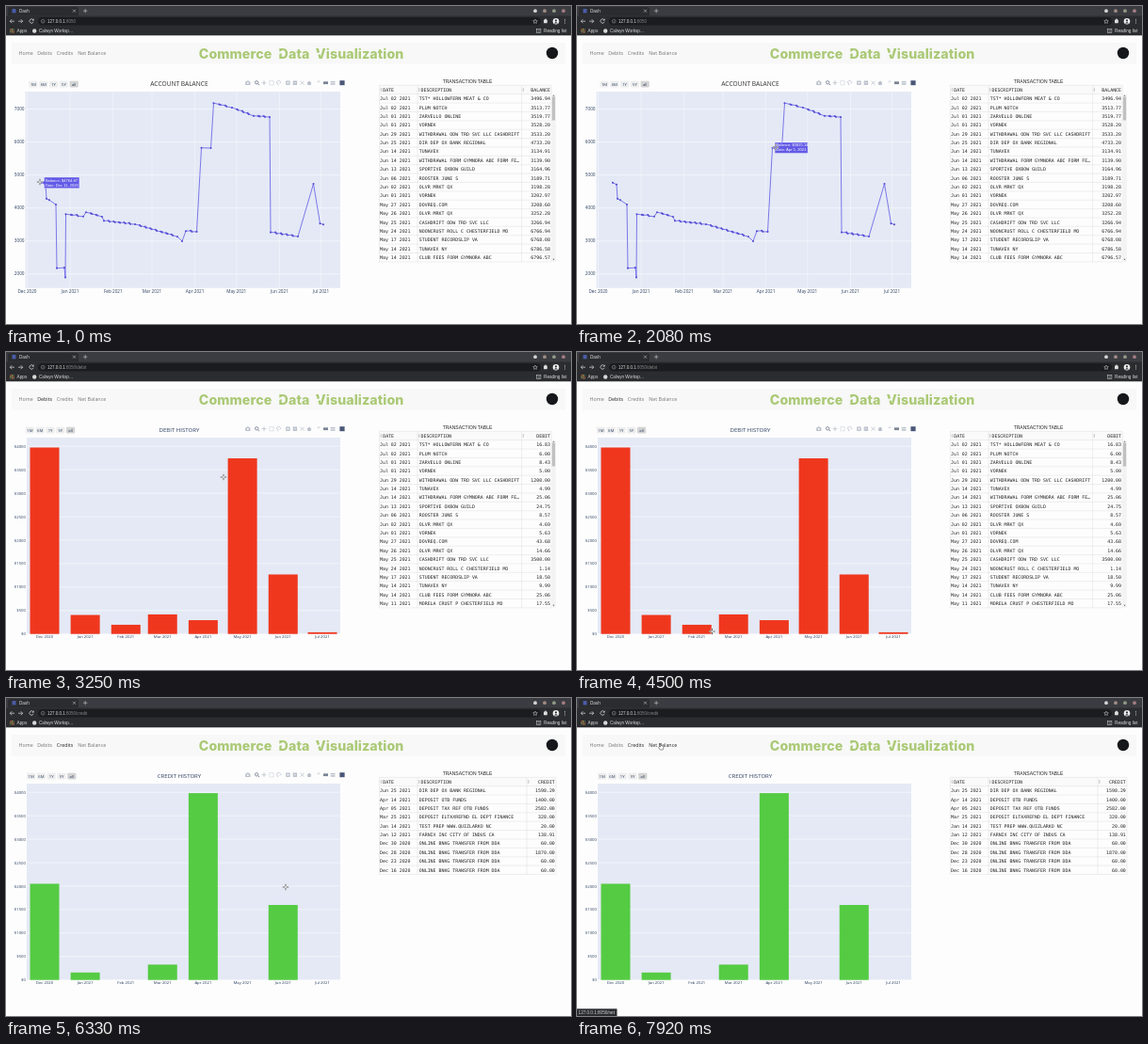
An HTML page for the animation above (8 s loop, 600 by 338 pixels).

```html
<!DOCTYPE html>
<html lang="en">
<head>
<meta charset="utf-8">
<title>Dash</title>
<style>
html, body { margin: 0; width: 100%; height: 100%; overflow: hidden; background: #fdfdfd; }
svg { display: block; width: 100vw; height: 100vh; font-family: "Liberation Sans", Arial, sans-serif; }
.mono { font: 4.92px "DejaVu Sans Mono", monospace; fill: #222; }
.title { font: 800 14.2px Inter, sans-serif; letter-spacing: .1px; fill: #abc976; }
#nav { font-family: "Noto Sans", sans-serif; }
.plot { font-family: "Open Sans", sans-serif; }
</style>
</head>
<body>
<svg viewBox="0 0 600 338">
  <g id="chrome"></g>
  <g id="nav"></g>
  <g id="page"></g>
  <g id="modebar"></g>
  <g id="tip"></g>
  <g id="status"></g>
  <g id="cursor"></g>
</svg>
<script>
const LOOP = 8000, STEP = 1000 / 12;
const $ = id => document.getElementById(id);
const rect = (x, y, w, h, fill, extra = '') =>
  `<rect x="${x}" y="${y}" width="${w}" height="${h}" fill="${fill}" ${extra}/>`;
const circle = (x, y, r, fill, extra = '') => `<circle cx="${x}" cy="${y}" r="${r}" fill="${fill}" ${extra}/>`;
const text = (x, y, s, size, fill, anchor = 'start') =>
  `<text x="${x}" y="${y}" font-size="${size}" fill="${fill}" text-anchor="${anchor}">${s}</text>`;
const mono = (x, y, s, anchor = 'start') => `<text class="mono" x="${x}" y="${y}" text-anchor="${anchor}">${s}</text>`;
const stroke = (d, color, width = .5, extra = '') =>
  `<path d="${d}" fill="none" stroke="${color}" stroke-width="${width}" ${extra}/>`;
const fillPath = (d, color) => `<path d="${d}" fill="${color}"/>`;
const parse = s => s.split('\n').map(r => r.split('|'));

const MONTHS = ['Dec', 'Jan', 'Feb', 'Mar', 'Apr', 'May', 'Jun', 'Jul'];
const DAYS = MONTHS.map((_, i) => (Date.UTC(2020, 11 + i) - Date.UTC(2020, 11)) / 864e5);
const monthLabel = i => `${MONTHS[i]} ${i ? 2021 : 2020}`;

// Date, description, change of balance
const ledger = parse(`Jul 02 2021|TST* HOLLOWFERN MEAT &amp; CO|-16.83
Jul 02 2021|PLUM NOTCH|-6.00
Jul 01 2021|ZARVELLO ONLINE|-8.43
Jul 01 2021|VORNEK|-5.00
Jun 29 2021|WITHDRAWAL ODW TRD SVC LLC CASHDRIFT|-1200.00
Jun 25 2021|DIR DEP OX BANK REGIONAL|1598.29
Jun 14 2021|TUNAVEX|-4.99
Jun 14 2021|WITHDRAWAL FORM GYMNORA ABC FORM FE…|-25.06
Jun 13 2021|SPORTIVE OXBOW GUILD|-24.75
Jun 06 2021|ROOSTER JUNE S|-8.57
Jun 02 2021|OLVR MRKT QX|-4.69
Jun 01 2021|VORNEK|-5.63
May 27 2021|DOVREQ.COM|-43.68
May 26 2021|OLVR MRKT QX|-14.66
May 25 2021|CASHDRIFT ODW TRD SVC LLC|-3500.00
May 24 2021|NOONCRUST ROLL C CHESTERFIELD MO|-1.14
May 17 2021|STUDENT RECORDSLIP VA|-18.50
May 14 2021|TUNAVEX NY|-9.99
May 14 2021|CLUB FEES FORM GYMNORA ABC|-25.06
May 11 2021|MORELA CRUST P CHESTERFIELD MO|-17.55`);

const deposits = parse(`Jun 25 2021|DIR DEP OX BANK REGIONAL|1598.29
Apr 14 2021|DEPOSIT OTB FUNDS|1400.00
Apr 05 2021|DEPOSIT TAX REF OTB FUNDS|2582.00
Mar 25 2021|DEPOSIT ELTAXREFND EL DEPT FINANCE|328.00
Jan 14 2021|TEST PREP WWW.QUIZLARKO NC|20.00
Jan 12 2021|FARNIX INC CITY OF INDUS CA|138.91
Dec 30 2020|ONLINE BNKG TRANSFER FROM DDA|60.00
Dec 28 2020|ONLINE BNKG TRANSFER FROM DDA|1870.00
Dec 23 2020|ONLINE BNKG TRANSFER FROM DDA|60.00
Dec 16 2020|ONLINE BNKG TRANSFER FROM DDA|60.00`);

let balance = 3496.94;
const balances = ledger.slice(0, 19).map(([date, desc, change]) => {
  const row = [date, desc, balance.toFixed(2)];
  balance -= change;
  return row;
});
const debits = ledger.filter(r => r[2] < 0).map(([date, desc, change]) => [date, desc, change.slice(1)]);
const income = MONTHS.map(m => deposits.reduce((sum, r) => sum + (r[0].startsWith(m) ? +r[2] : 0), 0));

// Turning points of the balance (x, dollars); gentle stretches get small uneven steps
const dollarY = v => 109.5 + (7000 - v) * .03506;
const turns = `38,4764.87 42,4710 43,4280 46,4240 53,4105 54,2175 62,2190 63,1895 63.5,3810 82,3740 85,3870
102,3735 104,3610 137,3505.05 182,3130 187,2993 191,3300 202.5,3280 207.5,5825.14 217.5,5816 220.5,7180
240,7040 263,6790 280,6758 281,3260 310,3135 326.5,4733.2 333.5,3530 337,3496.94`
  .split(/\s+/).map(p => p.split(',').map(Number));
let seed = 7;
const random = () => (seed = seed * 16807 % 2147483647) / 2147483647;
const samples = turns.flatMap(([x, v], i) => {
  const out = [[x, v]], [x1, v1] = turns[i + 1] || [x, v];
  const n = Math.abs(v1 - v) < 500 ? Math.floor((x1 - x) / 5.1) : 1;
  for (let k = 1; k < n; k++) {
    const f = k / n, px = x + (x1 - x) * f, pv = v + (v1 - v) * f, d = 8 + 18 * random();
    out.push([px - .6, pv + d], [px + .6, pv - d * .4]);
  }
  return out;
}).map(([x, v]) => ({ x, v, y: dollarY(v) }));

const BASE = 299.7;
const bars = values => values.map((v, i) => ({ i, v, x: 41 + 1.3915 * DAYS[i], y: BASE - v * .04987 }));
const PAGES = [
  { path: '', title: 'ACCOUNT BALANCE', buttons: 29, color: '#625ae6', rows: balances, head: 'BALANCE' },
  { path: '/debit', title: 'DEBIT HISTORY', buttons: 25.4, color: '#ef371e', rows: debits, head: 'DEBIT', label: 'Debit',
    bars: bars([3974, 405, 196, 417, 294, 3743, 1268, 36]) },
  { path: '/credit', title: 'CREDIT HISTORY', buttons: 26.6, color: '#55cb43', rows: deposits, head: 'CREDIT', label: 'Credit',
    bars: bars(income) }
];

function drawChrome() {
  let s = rect(0, 0, 600, 31.3, '#2b2c2f') + rect(0, 0, 600, 10.5, '#3b3c41') +
    fillPath('M2 10.5V2.5Q2 1 4 1H74Q77 1 77 3V10.5Z', '#2b2c2f') +
    rect(6.5, 3, 4, 4.4, '#4b5ca8') + text(14, 7, 'Dash', 4.6, '#ddd') +
    stroke('M71 3.7l3 3m0-3l-3 3M82 5.2h4.4M84.2 3v4.4', '#ccc', .6);
  ['#d5d5d5', '#a08c86', '#8f9a86', '#a37d84'].forEach((c, i) => { s += circle(562 + i * 10, 5.2, 1.9, c); });
  s += rect(34, 12, 534, 8.6, '#1b1c1f', 'rx="4.3"') +
    stroke('M14 16.2H9.3m2-2l-2 2 2 2M18 16.2h4.7m-2-2l2 2-2 2', '#ddd', .7, 'transform="translate(-5)"') +
    stroke('M29 14.8a2.2 2.2 0 1 0 .2 2M29.3 13.6v1.6h-1.7', '#ddd', .7) +
    circle(39.2, 16.2, 1.9, 'none', 'stroke="#aaa" stroke-width=".5"') + stroke('M39.2 15.8v1.4', '#aaa') +
    stroke('M562 14l.7 1.5 1.6.2-1.2 1.1.3 1.6-1.4-.8-1.4.8.3-1.6-1.2-1.1 1.6-.2z', '#ddd') +
    rect(571, 14.6, 3.8, 3.6, '#ddd', 'rx=".6"') + circle(573, 14.4, .9, '#ddd') +
    circle(584, 16.2, 3.3, '#eee') + circle(584, 15.4, 1.1, '#34363b') + fillPath('M582 18.4q2-3 4 0z', '#34363b');
  for (let i = 0; i < 3; i++) s += circle(593.5, 14.3 + i * 1.8, .5, '#ddd');
  const dots = ['#dd6655', '#e5b64b', '#68a764'];
  for (let i = 0; i < 9; i++) {
    const col = i % 3, row = i / 3 | 0;
    s += rect(4.3 + col * 1.6, 24.2 + row * 1.6, 1.1, 1.1, dots[(col + row) % 3]);
  }
  s += text(11.6, 28.2, 'Apps', 4.7, '#ddd') + circle(30.2, 26.5, 2.2, '#d8d8d8') +
    text(35, 28.2, 'Calwyn Worksp…', 4.6, '#ddd') +
    rect(563.5, 24.4, 4.4, 4.2, 'none', 'stroke="#ddd" stroke-width=".5"') +
    stroke('M564.5 25.8h2.5M564.5 27.2h2.5', '#ddd', .4) + text(571, 28.2, 'Reading list', 4.7, '#ddd') +
    '<text x="44" y="17.9" font-size="4.5" fill="#ddd">127.0.0.1<tspan id="url" fill="#858688"></tspan></text>' +
    rect(6, 39, 588, 22.5, '#f7f8f7');
  [[204.8, 'Commerce'], [289.6, 'Data'], [328.8, 'Visualization']].forEach(([x, w]) => {
    s += `<text class="title" x="${x}" y="55.5">${w}</text>`;
  });
  // Stencil cuts in the capitals
  s += stroke('M289 50.3l5-1.8M328.5 52.3l6.3-3', '#f7f8f7', 2) + circle(580, 50, 6.2, '#15171a');
  $('chrome').innerHTML = s;
}

const LINKS = [['Home', 13.6, 28.5], ['Debits', 33.2, 49], ['Credits', 53.8, 71.5], ['Net Balance', 76.3, 106.5]];
const ROUTES = ['/', '/debit', '/credit', '/net'];

function drawTable(rows, head, scroll) {
  const top = 84.3, h = 9.38, left = 396.5, bottom = top + h * (rows.length + 1);
  const [split, right] = scroll ? [547.5, 579.2] : [553, 584];
  let s = text(490, 81.6, 'TRANSACTION TABLE', 5, '#222', 'middle') + rect(left, top, right - left, h, '#fafafa');
  let lines = '';
  for (let i = 0; i <= rows.length + 1; i++) lines += `M${left} ${top + i * h}H${right}`;
  for (const x of [left, 437, split, right]) lines += `M${x} ${top}V${bottom}`;
  s += stroke(lines, '#d6d6d6', .4);
  for (const x of [398.4, 438.6, split + 1.8]) {
    s += fillPath(`M${x - .9} 88.6l.9-1.6.9 1.6zM${x - .9} 89.4l.9 1.6.9-1.6z`, '#aaa');
  }
  s += mono(400.2, 90.8, 'DATE') + mono(440.5, 90.8, 'DESCRIPTION') + mono(right - 1.2, 90.8, head, 'end');
  rows.forEach(([date, desc, value], i) => {
    const y = top + h * (i + 1) + 6.5;
    s += mono(397, y, date) + mono(438.8, y, desc) + mono(right - 1.2, y, value, 'end');
  });
  if (scroll) {
    s += rect(579.2, 93.7, 4.6, 178, '#f3f3f3') + rect(579.8, 96.5, 3.4, 25, '#c1c1c1') +
      fillPath('M580.5 95.8l1-1.4 1 1.4zM580.5 268.8l1 1.4 1-1.4z', '#666');
  }
  return s;
}

function drawPage(n) {
  const p = PAGES[n], ink = '#2a3f5f', left = n ? 22 : 20.5, scale = n ? .357 : .39;
  const small = 12 * scale;
  let s = rect(left, 91, 355 - left, BASE - 91, '#e4e9f5') +
    text(184, 85.2, p.title, 17 * scale, n ? ink : '#333', 'middle');
  const grid = (y, label) => stroke(`M${left} ${y}H355`, '#fff', .5) + text(left - 1, y + 1.6, label, small, ink, 'end');
  ['1M', '6M', '1Y', '5Y', 'all'].forEach((b, i) => {
    const x = p.buttons + i * 10.8;
    s += rect(x - 4.6, 79.8, 9.2, 6.6, i < 4 ? '#eee' : '#d4d4d4', 'rx=".8"') + text(x, 84.6, b, 4.2, ink, 'middle');
  });
  if (n) {
    for (let i = 0; i < 9; i++) s += grid(BASE - i * 24.935, '$' + i * 500);
    p.bars.forEach(b => {
      s += rect(b.x - 15.5, b.y, 31, BASE - b.y, p.color) + text(b.x, 304.3, monthLabel(b.i), small, ink, 'middle');
    });
  } else {
    for (let v = 2000; v <= 7000; v += 1000) s += grid(dollarY(v), v);
    DAYS.forEach((d, i) => {
      const x = 22.5 + 1.472 * d;
      s += stroke(`M${x} 91V${BASE}`, '#fff', .4) + text(x, 304.6, monthLabel(i), small, ink, 'middle');
    });
    s += stroke('M' + samples.map(q => `${q.x} ${q.y}`).join('L'), p.color, .8, 'stroke-linejoin="round"') +
      samples.map(q => circle(q.x, q.y, 1.05, '#5750d6')).join('');
  }
  $('page').innerHTML = `<g class="plot">${s}</g>` + drawTable(p.rows, p.head, n < 2);
  $('url').textContent = ':8050' + p.path;
}

function drawModebar() {
  const c = '#b9bfca', d = '#7c8594', y = 81.7;
  const plus = x => `M${x - 1.3} ${y}h2.6M${x} ${y - 1.3}v2.6`;
  const box = x => rect(x - 2.2, y - 2.2, 4.4, 4.4, c);
  $('modebar').innerHTML = rect(254.2, 80.3, 5.2, 3.6, c, 'rx=".5"') + rect(255.8, 79.4, 2, 1.2, c) + circle(256.8, 82.1, 1, '#fff') +
    circle(266.2, 81.3, 1.7, 'none', `stroke="${d}" stroke-width=".9"`) + stroke('M267.4 82.5l1.7 1.7', d, 1) +
    stroke(`M274 79.3v4.8M271.6 ${y}h4.8`, c, .8) +
    rect(279.8, 79.6, 4.3, 4.3, 'none', `stroke="${c}" stroke-width=".6" stroke-dasharray="1 .5"`) +
    stroke('M288.8 82.4a2.2 1.5 0 1 1 1.6 0M288.2 82.2l.6 2', c, .7) +
    box(299.4) + stroke(plus(299.4), '#fff', .7) + box(306.9) + stroke(`M305.6 ${y}h2.6`, '#fff', .7) +
    stroke('M312.5 79.7l4 4m0-4l-4 4', c, .8) + fillPath('M319.4 82l2.6-2.5 2.6 2.5h-.8v2h-3.6v-2z', c) +
    stroke('M330.5 80h3M332 80v1.4', c, .6) + rect(337, 80.3, 5, 2.8, d) +
    rect(344.7, 79.9, 4.8, 1.5, c) + rect(344.7, 82.2, 4.8, 1.5, c) + rect(354.4, 79.2, 5.2, 5, '#4a5878');
}

// Stops of the pointer: time, x, y
const STOPS = [[290, 36, 187], [670, 62, 222], [1250, 139.5, 231], [1750, 200, 239], [2083, 211, 150], [2500, 42, 51],
  [2850, 41, 51], [3250, 231, 133], [3920, 296, 262], [4500, 143.5, 297], [5080, 64, 52], [5420, 62, 51],
  [6333, 297, 201], [6917, 46, 225], [7833, 88, 52], [7917, 89, 51]];

function pointer(t) {
  const next = STOPS.findIndex(k => k[0] > t), b = STOPS.at(next), a = next > 0 ? STOPS[next - 1] : b;
  const u = a === b ? 0 : Math.min(1, (t - a[0]) / (b[0] - a[0])), f = u * u * (3 - 2 * u);
  return { x: a[1] + (b[1] - a[1]) * f, y: a[2] + (b[2] - a[2]) * f };
}

function hoverInfo(page, c) {
  const p = PAGES[page];
  if (p.bars) {
    const b = p.bars.find(b => Math.abs(c.x - b.x) < 15.5 && c.y > b.y && c.y < BASE);
    return b && { ...b, lines: [`${p.label}: $${b.v.toFixed(2)}`, `Date: ${monthLabel(b.i)}`], w: 34 };
  }
  const dist = q => Math.hypot(q.x - c.x, q.y - c.y);
  const q = samples.reduce((a, b) => dist(b) < dist(a) ? b : a);
  if (dist(q) > 8) return;
  const day = Math.floor((q.x - 22.5) / 1.472), m = DAYS.filter(d => d <= day).length - 1;
  return { ...q, lines: [`Balance: $${q.v.toFixed(2)}`, `Date: ${MONTHS[m]} ${day - DAYS[m] + 1}, ${m ? 2021 : 2020}`],
    w: m === 4 ? 35 : 37.3 };
}

function tipSvg(h, color) {
  const x = h.x + 2.6, y = h.y - 5.8;
  return `<path d="M${h.x} ${h.y}L${x} ${h.y - 2}V${y}h${h.w}v11.6h${-h.w}V${h.y + 2}Z" fill="${color}" stroke="#fff" stroke-width=".35"/>` +
    h.lines.map((l, i) => text(x + 1.3, y + 4.6 + i * 5, l, 4.1, '#fff')).join('');
}

function cursorSvg({ x, y }, kind) {
  const cross = 'M-3.2 0H-.8M.8 0H3.2M0-3.2V-.8M0 .8V3.2';
  const shape = {
    cross: stroke(cross, '#fff', 1.7) + stroke(cross, '#4a4a4a', .9),
    hand: '<path d="M-.6-2.4Q0-3 .5-2.4V-.4L2.4.2Q3 .5 2.8 1.6L2.2 4H-.8L-2.4 1.4Q-2-.1-.6 1Z" fill="#fff" stroke="#333" stroke-width=".5"/>',
    arrow: '<path d="M0 0V5.6L1.3 4.4 2.2 6.3 3 5.9 2.2 4.1H4Z" fill="#222" stroke="#fff" stroke-width=".5"/>'
  }[kind];
  return `<g transform="translate(${x} ${y})">${shape}</g>`;
}

let shown = -1;
function render(ms) {
  const t = Math.floor((ms + 5) / STEP) * STEP;
  const page = t < 2740 ? 0 : t < 5320 ? 1 : 2;
  if (page !== shown) drawPage(shown = page);
  const c = pointer(t);
  const link = LINKS.findIndex(l => c.y > 45 && c.y < 56 && c.x > l[1] - 1 && c.x < l[2] + 1);
  const inPlot = c.x > 21 && c.x < 355 && c.y > 91 && c.y < BASE;
  const tip = inPlot && hoverInfo(page, c);
  $('nav').innerHTML = LINKS.map(([s, x], i) =>
    text(x, 52, s, 5.3, i === link || (page && i === page) ? '#333' : '#7d7d7d')).join('');
  $('modebar').style.display = c.x < 366 && c.y > 70 && c.y < 315 ? '' : 'none';
  $('tip').innerHTML = tip ? tipSvg(tip, PAGES[page].color) : '';
  $('status').innerHTML = link < 0 ? '' :
    rect(0, 330.3, 42.5, 7.7, '#2b2c2f') + text(1.6, 335.8, '127.0.0.1:8050' + ROUTES[link], 4.6, '#d5d5d5');
  $('cursor').innerHTML = cursorSvg(c, link >= 0 ? 'hand' : inPlot ? 'cross' : 'arrow');
}

drawChrome();
drawModebar();
const start = performance.now();
(function tick() {
  render((performance.now() - start) % LOOP);
  requestAnimationFrame(tick);
})();
</script>
</body>
</html>
```
